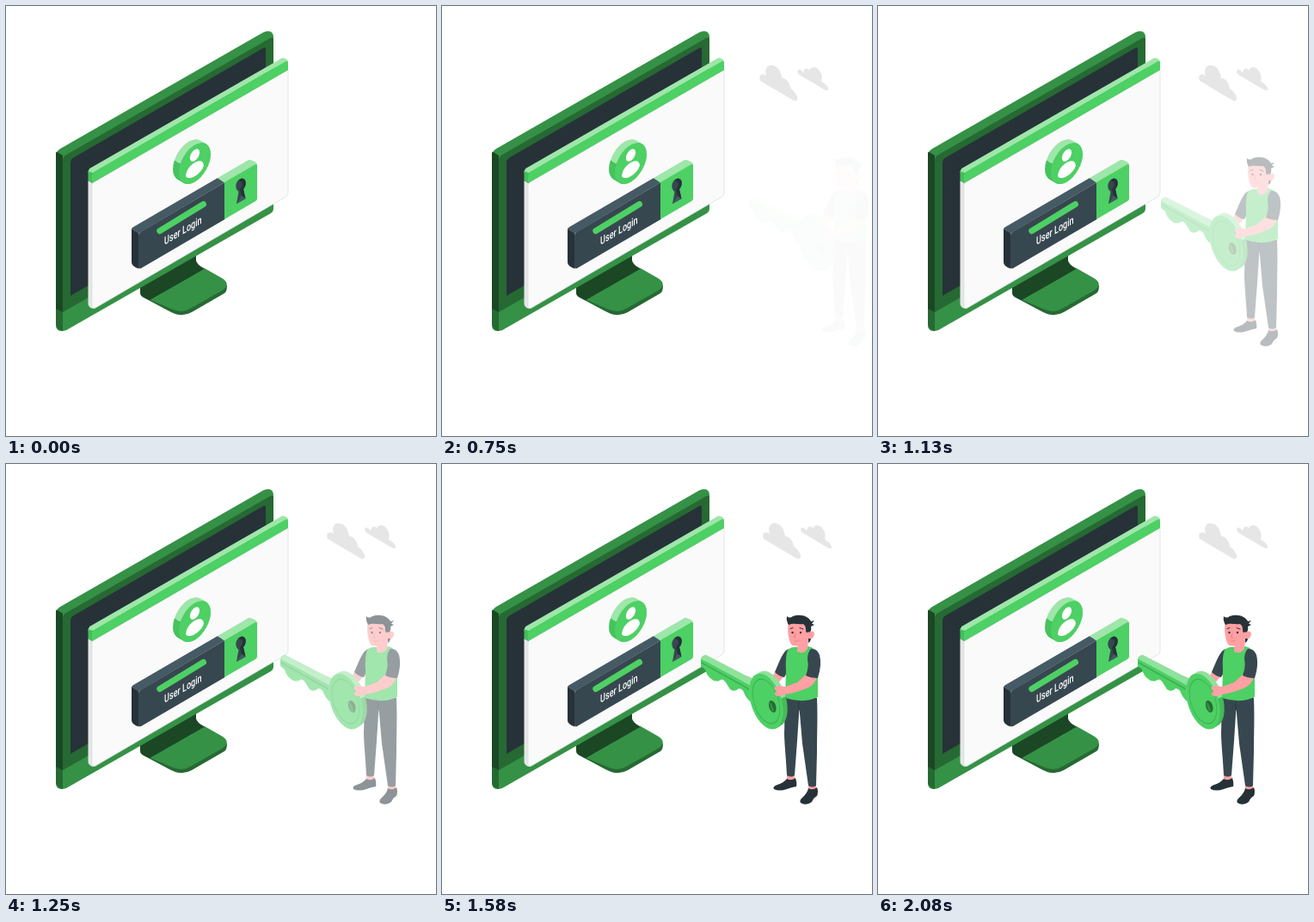
Animation of 500 by 500 pixels, one loop 2120 ms. Source, as an HTML page:

```html
<!DOCTYPE html>
<html lang="en">
<head>
<meta charset="utf-8">
<title>User Login</title>
<style>
  html, body { margin: 0; width: 100%; height: 100%; overflow: hidden; background: #fff; }
  svg { display: block; width: 100vw; height: 100vh; }
  .mid { fill: #359146; }
  .deep { fill: #266933; }
  .dark { fill: #1b4724; }
  .green { fill: #4dd064; }
  .pale { fill: #9ee6a9; }
  .ink { fill: #263238; }
  .slate { fill: #37474f; }
  .steel { fill: #455a64; }
  .skin { fill: #ffa0a3; }
  .line { fill: none; stroke-linecap: round; stroke-linejoin: round; }
  text { font: 500 13px Roboto, Arial, sans-serif; fill: #fff; }
</style>
</head>
<body>
<svg viewBox="0 0 500 500">
  <defs>
    <linearGradient id="rim" gradientUnits="userSpaceOnUse" x1="15" y1="-15" x2="-15" y2="15">
      <stop offset=".67" stop-color="#9ee6a9"/>
      <stop offset=".67" stop-color="#46c35c"/>
    </linearGradient>
    <linearGradient id="bow" gradientUnits="userSpaceOnUse" x1="-18.700" y1="-23.400" x2="18.700" y2="23.400">
      <stop offset=".6" stop-color="#8fe29c"/>
      <stop offset=".6" stop-color="#43ba58"/>
    </linearGradient>
  </defs>

  <!-- stand -->
  <path class="deep" d="M156 324V334Q156 337 160 339L190 355Q204 363 216 356L254 334Q257 332 257 325L231 310Z"/>
  <path class="mid" d="M231 305L252 317Q262 324 251 331L214 352Q204 358 192 352L166 341Z"/>
  <path class="dark" d="M156 322L221 284V296Q222 301 231 305.500L167 342Q156 338 156 332Z"/>

  <!-- monitor -->
  <path class="mid" d="M58 174Q58 169 63 166L299 30.700Q311 26 311 37V236Q311 239 308 241L70 377Q58 381 58 370Z"/>
  <path class="deep" d="M58 351L66 355V378Q58 376 58 370Z"/>
  <path class="dark" d="M58 171Q58 169 60 170L66 174V356L58 352Z"/>
  <path class="deep" d="M66 180Q66 175 70 173L306 38Q311 35 311 39V216L66 356Z"/>
  <path class="ink" d="M75 182Q75 178 79 176L299 49Q302 47 302 51V206L75 337Z"/>

  <!-- window -->
  <path fill="#e6e6e6" d="M95.500 203L101 206V352Q95.500 350 95.500 346Z"/>
  <path fill="#fafafa" stroke="#d7e2e1" stroke-width=".8" d="M100 206L328 74V217Q328 220 325 222L104 351Q100 353 100 348Z"/>
  <path class="pale" d="M95.500 194Q95.500 190 98 188.500L321 60.500Q323 59.500 328 63L100 195Z"/>
  <path fill="#45bf5b" d="M95.500 192L101 194V206.500L95.500 203Z"/>
  <path class="green" d="M100 198Q100 194.500 103 192.500L325 64.500Q328 62.500 328 66V74.500L100 206Z"/>

  <!-- avatar -->
  <g transform="matrix(.866 -.5 0 1 219.500 183)">
    <path class="line" stroke="url(#rim)" stroke-width="42.800" d="M-8-8L0 0"/>
    <circle class="green" r="21.400"/>
    <circle fill="#fff" cy="-9.500" r="6.500"/>
    <path fill="#fff" d="M-12 9C-12 3-7-1 0-1S12 3 12 9C8 17-8 17-12 9Z"/>
  </g>

  <!-- login bar -->
  <path class="ink" d="M146 259L154.500 264V305.500Q146 303 146 298Z"/>
  <path class="steel" d="M146 259.500Q146 258 148 257L246 200L254.500 205L154 264.500Z"/>
  <path class="slate" d="M154 268Q154 264 157 262.500L254.500 205V248L157 305Q154 306 154 303Z"/>
  <path class="pale" d="M246 200L282 179Q284 178 292 183L254 205.500Z"/>
  <path class="green" d="M254 205L290 184Q292 183 292 185V224Q292 226 290 227L254 248Z"/>
  <path class="line" stroke="#4dd064" stroke-width="7" d="M178.800 261.500L229.500 230.500"/>
  <text transform="matrix(.7 -.41 0 1 184 278)">User Login</text>
  <path class="slate" d="M270.500 216C265 212 267 202 274 200.500C280 200 280 209 276 213L278.500 224L268 230Z"/>
  <path class="ink" d="M274 200.500C280 200 280 209 276 213L278.500 224L274 221L272 213C276 209 277 204 270 203Q272 201 274 200.500Z"/>
  <path class="steel" d="M268 230L274 221L278.500 224Z"/>

  <g id="clouds" fill="#e6e6e6">
    <path d="M374 87C371 79 377 78 381 81C378 73 383 68 388 69C395 70 398 77 399 84C405 84 408 90 409 96C414 99 418 105 417 109C415 111 413 110 411 109Z"/>
    <path d="M418 79C415 73 421 72 424 78C424 73 429 71 431 75C433 70 440 70 443 76C446 79 446 84 445 88C450 90 454 95 453 98C450 99 447 96 443 94L421 81Z"/>
  </g>

  <g id="hero">
    <!-- legs -->
    <path class="skin" d="M402 360H411V369H402ZM427 370H436V380H427Z"/>
    <path class="ink" d="M402 366Q407 369 412 365Q414 371 413 375Q407 376 402 378Q393 381 387 378Q385 375 391 373Q398 371 402 366ZM427 377Q432 380 437 376Q439 381 437 386Q433 388 431 393Q424 398 418 394Q416 391 421 387Q426 382 427 377Z"/>
    <path class="slate" d="M400 268L437 272C438 295 437 315 437 335L436 374Q432 377 427 374L420 325L416.500 284L414 322L411 362Q407 365 402 362C401 340 399 325 399 312C400 300 398 285 400 268Z"/>
    <path class="line" stroke="#263238" stroke-width=".8" d="M416.500 286Q415 281 416 277"/>

    <!-- far arm -->
    <path class="skin" d="M390 239L399 246L391 256L381 254Z"/>
    <path class="skin" d="M351 249Q352 245 357 247L366 251L361 257Z"/>
    <path class="slate" d="M404 215C398 217 394 228 388 242Q393 247 399 248L408 232Z"/>

    <!-- torso -->
    <path class="green" d="M403 216Q408 212 415 213L427 212Q437 214 438 225L438 271Q421 279 400 272L401 240Q400 224 403 216Z"/>
    <path class="skin" d="M415 205H427L426 215Q421 222 414 218Z"/>

    <!-- head -->
    <path class="skin" d="M404 183C402 194 404 202 406 208Q408 213 416 211Q424 210 427 204Q433 204 434 198Q434 193 428 195L425 183Z"/>
    <path class="ink" d="M404 187Q401 182 402 177Q405 180 409 177C418 174 427 177 430 183L434 182L431 185.500L434 187L430 189C431 194 429 195 428 196L427 195Q424 198 424 192C424 188 422 187 421 186C415 187 410 184 404 187ZM427 203L430 203Q430 206 427 208Z"/>
    <g class="ink"><circle cx="408.500" cy="196" r="1.200"/><circle cx="418" cy="196" r="1.200"/></g>
    <path class="line" stroke="#263238" d="M406 191.500L409 190.500M417 190.500L421 192"/>
    <path class="line" stroke="#ee7d84" d="M412 197L410.500 201.500L412.500 202M411 206Q414 207 416 205"/>

    <!-- key -->
    <path class="green" d="M302 226L366 260L362 278Q356 274 353 268Q351 261 346 261Q341 266 336 262L331 254Q328 249 325 251Q319 255 313 249Q309 246 307 239L302 235Z"/>
    <path fill="#8fe29c" d="M302 226Q304 222 308 222L368 253L362 259Z"/>
    <path class="line" stroke="#3fae54" stroke-width="1.500" d="M303 231L360 263"/>
    <g transform="matrix(.66 .4 0 1 378 276)">
      <path class="line" stroke="url(#bow)" stroke-width="60" d="M7.500-6L0 0"/>
      <circle class="green" r="30"/>
      <circle fill="none" stroke="#3fae54" stroke-width="1.200" r="24"/>
      <circle class="deep" cx="11" cy="1.500" r="6.500"/>
      <path class="mid" d="M6-2Q12-1 14 7Q7 8 6-2Z"/>
    </g>

    <!-- near arm -->
    <path class="skin" d="M425 244L437 247Q435 256 427 260Q413 266 400 268L393 270Q387 270 388 266L391 264Q386 263 388 259Q392 257 400 259L414 254Z"/>
    <path class="slate" d="M430 215Q437 214 440 222Q443 233 438 249Q430 249 424 246Q428 236 426 227Q426 219 430 215Z"/>
  </g>
</svg>
<script>
  const FPS = 24, LOOP = 2120;
  const heroX = [[18, 55], [22, 42], [27, 27], [30, 17], [34, 6], [38, -1], [42, -4], [45, -4], [47, -3], [50, 0]];
  const heroFade = [[15, 0], [18, .02], [22, .1], [27, .32], [30, .52], [34, .81], [38, 1]];
  const cloudX = [[12, 11], [13, 8], [14, 4], [15, 1], [16, -2], [17, -3.5], [18, -3.8], [22, -1], [24, 0]];
  const cloudFade = [[11, 0], [12, .2], [16, 1]];

  function tween(keys, f) {
    const next = keys.findIndex(k => k[0] > f);
    if (next === 0) return keys[0][1];
    if (next < 0) return keys[keys.length - 1][1];
    const [f0, v0] = keys[next - 1], [f1, v1] = keys[next];
    return v0 + (v1 - v0) * (f - f0) / (f1 - f0);
  }

  function pose(id, x, fade, f) {
    const el = document.getElementById(id);
    el.setAttribute('transform', `translate(${tween(x, f)} 0)`);
    el.setAttribute('opacity', tween(fade, f));
  }

  const start = performance.now();
  function draw() {
    const t = (performance.now() - start) % LOOP;
    let f = Math.floor(t * FPS / 1000 + .1);
    if (f > 18 && f < 22) f = 18; // short pause before the walk-in
    pose('clouds', cloudX, cloudFade, f);
    pose('hero', heroX, heroFade, f);
    requestAnimationFrame(draw);
  }
  draw();
</script>
</body>
</html>
```
